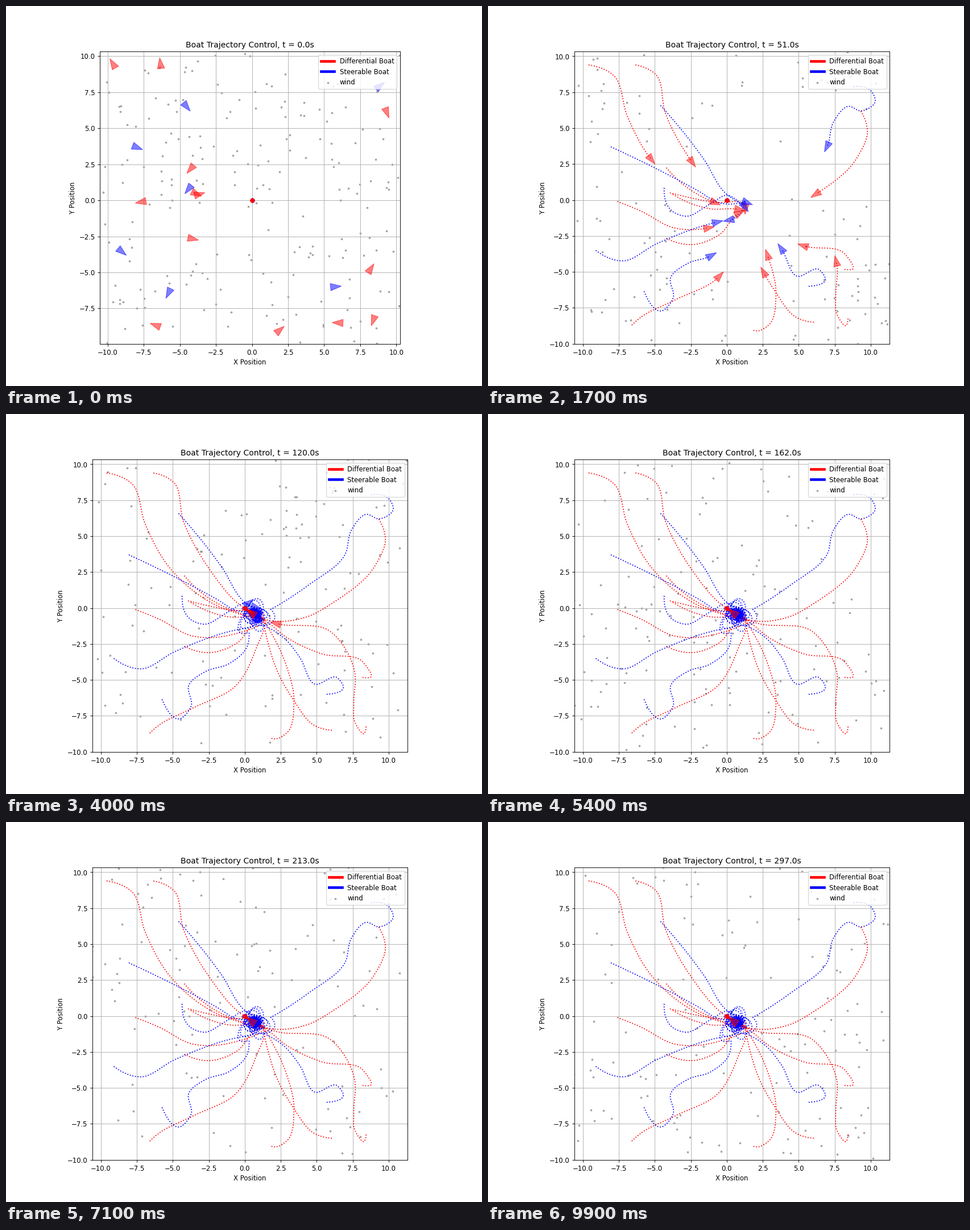
Animation, 837 px wide and 669 px high, one loop 10000 ms. Source, as a matplotlib script:

```python
import numpy as np
import matplotlib.pyplot as plt
from matplotlib.animation import FuncAnimation
from matplotlib.patches import Polygon

W, H, DPI = 837, 669, 83.7
FRAMES, SUB = 100, 8            # animation frames, trail samples per frame
CHECK = 17                      # time, in frames, at the end of a boat's first leg
HOME = np.array([0.52, -0.37])  # where the red boats hold against the wind
HUB = np.array([0.68, -0.45])   # what the blue boats circle around
REST_DIR = np.radians(144)
HULL = np.array([[0.5, 0], [-0.25, 0.25], [-0.25, -0.25]])

rng = np.random.default_rng(7)
clock = np.arange((FRAMES - 1) * SUB + 1) / SUB
boats = []


def smooth(points):
    """Cubic Hermite curve through points: knots, parameter, positions."""
    p = np.array(points, float)
    t = np.r_[0, np.cumsum(np.hypot(*np.diff(p, axis=0).T))]
    m = np.gradient(p, t, axis=0, edge_order=2)
    u = np.linspace(0, t[-1], 800)
    i = np.clip(np.searchsorted(t, u, side="right") - 1, 0, len(t) - 2)
    h = (t[i + 1] - t[i])[:, None]
    a = (u - t[i])[:, None] / h
    b = 1 - a
    q = (b * b * (1 + 2 * a) * p[i] + a * a * (1 + 2 * b) * p[i + 1]
         + a * b * h * (b * m[i] - a * m[i + 1]))
    return t, u, q


def unit(angle):
    return np.column_stack([np.cos(angle), np.sin(angle)])


def orbit(pos, late, arrive):
    """Shrinking, wobbling circles around HUB after arrival."""
    rel = pos[late][0] - HUB
    tau = clock[late] - arrive
    r0 = np.hypot(*rel)
    r = 0.06 + (r0 - 0.06) * np.exp(-tau / 14)
    r *= 1 + 0.35 * np.sin(rng.uniform(0.9, 1.7) * tau)
    step = pos[late][0] - pos[np.argmax(late) - 2]
    turn = 1 if rel[0] * step[1] - rel[1] * step[0] > 0 else -1
    spin = np.cumsum(0.45 / np.maximum(r, 0.3)) / SUB
    pos[late] = HUB + r[:, None] * unit(np.arctan2(rel[1], rel[0]) + turn * spin)


def add_boat(color, heading, *leg, then=()):
    """Steady speed along the bends of leg (done at CHECK), then on to the centre."""
    red = color == "red"
    finish = [(1.25, -0.75), tuple(HOME)] if red else []
    t, u, q = smooth([*leg, *then, *finish])
    s = np.r_[0, np.cumsum(np.hypot(*np.diff(q, axis=0).T))]
    speed = np.interp(t[len(leg) - 1], u, s) / CHECK
    arrive = s[-1] / speed
    pos = np.column_stack([np.interp(clock * speed, s, q[:, k]) for k in (0, 1)])
    late = clock >= arrive
    if not red and late.any():
        orbit(pos, late, arrive)

    v = np.gradient(pos, axis=0)
    v /= np.maximum(np.hypot(*v.T), 1e-9)[:, None]
    fade = (arrive - clock) / 3 if red else (arrive + 26 - clock) / 18
    w = np.clip(fade, 0, 1)[:, None]
    d = w * v + (1 - w) * unit([REST_DIR])
    w = np.clip(1 - clock / 2, 0, 1)[:, None]
    d = w * unit([np.radians(heading)]) + (1 - w) * d
    boats.append((color, pos, np.arctan2(d[:, 1], d[:, 0])))


# Start, a few bends and the place reached at CHECK.
add_boat("red", 121, (-9.6, 9.4), (-7.9, 8.7), (-6.9, 5.8), (-5.3, 2.9),
         then=[(-2, 0.2)])
add_boat("red", 97, (-6.34, 9.4), (-5, 8.8), (-4.25, 6), (-2.45, 2.7),
         then=[(-0.2, 0.1)])
add_boat("red", 230, (-4.2, 2.25), (-2.2, 0.5), (-0.9, -0.15))
add_boat("red", -25, (-3.95, 0.5), (-1, -0.15), (1.3, -0.5))
add_boat("red", 15, (-3.75, 0.4), (-1.2, -0.6), (0.8, -0.65))
add_boat("red", 191, (-7.6, -0.1), (-6, -0.75), (-3.6, -1.95), (-1.35, -1.95))
add_boat("red", -13, (-4.2, -2.65), (-2.5, -3.1), (-0.5, -2.4), (0.8, -0.95))
add_boat("red", 160, (-6.6, -8.7), (-6.1, -8.25), (-3.6, -6.95), (-0.57, -5.35),
         then=[(0.75, -2.9)])
add_boat("red", 40, (1.85, -9.06), (2.1, -9.1), (2.9, -8.7), (3.42, -6.6),
         (2.85, -3.9), then=[(1.65, -1.4)])
add_boat("red", 178, (6.05, -8.5), (5, -8.25), (3.3, -6.25), (2.6, -5.1),
         then=[(1.4, -1.5)])
add_boat("red", 251, (8.43, -8.24), (8.3, -8.72), (7.63, -7.9), (7.57, -6.8),
         (7.62, -4.35), then=[(5.9, -1.6), (2.1, -1.05)])
add_boat("red", 57, (8.18, -4.82), (8.75, -4.8), (8.2, -3.75), (5.4, -3.2),
         then=[(3, -2.1)])
add_boat("blue", -51, (-4.6, 6.58), (-1.6, 2.85), (0, 0.4), (1.2, -0.35))
add_boat("blue", -21, (-8.05, 3.7), (-2, 0.65), (-0.5, -0.2), (1.3, -0.1))
add_boat("blue", 232, (-4.35, 0.85), (-3.75, -0.8), (-2.9, -1.12), (-1.2, -0.3),
         (0.05, 0.33), (1.1, -0.6), (0.3, -1.4))
add_boat("blue", -39, (-9.1, -3.5), (-7.25, -4.23), (-4.9, -3.05), (-0.75, -1.55),
         then=[(1.2, -1.2)])
add_boat("blue", 244, (-5.75, -6.35), (-4.5, -7.7), (-3.72, -6.8), (-3.9, -5.4),
         (-2.7, -4.4), (-1.15, -3.9), then=[(0.15, -2.7), (0.3, -1.7)])
add_boat("blue", 5, (5.69, -6), (6.85, -5.5), (6.4, -4.83), (4.9, -5.3),
         (3.83, -3.45), then=[(2.9, -2.25), (1.3, -1.2)])
add_boat("blue", 38, (8.79, 7.88), (10.05, 7.55), (10.32, 6.9), (9.3, 6.2),
         (8.5, 6.52), (7.4, 5.4), (7, 3.8), then=[(4.5, 1.65), (1.8, -0.1)])
add_boat("red", -69, (9.31, 6.18), (9.77, 4.8), (9.05, 2.95), (6.25, 0.45),
         then=[(4.2, -0.65), (2, -0.9)])

# Wind specks: drifting random walk, wrapped inside a square.
gusts = rng.normal((0.9, -0.6), 0.5, (FRAMES, 200, 2))
gusts[0] = rng.uniform(-10.4, 10.4, (200, 2))
wind_pos = (np.cumsum(gusts, axis=0) + 13) % 26 - 13

fig, ax = plt.subplots(figsize=((W + 0.01) / DPI, (H + 0.01) / DPI), dpi=DPI)
ax.set_aspect("equal")
ax.grid(True)
ax.set_xlabel("X Position")
ax.set_ylabel("Y Position")

keys = [ax.plot([], [], color=c, lw=4, label=f"{kind} Boat")[0]
        for c, kind in (("red", "Differential"), ("blue", "Steerable"))]
wind = ax.scatter(*wind_pos[0].T, s=5, color="gray", alpha=0.6, label="wind")
hulls = [ax.add_patch(Polygon(HULL, color=c, alpha=0.5, zorder=2.5))
         for c, _, _ in boats]
trails = [ax.plot([], [], ":", color=c)[0] for c, _, _ in boats]
ax.plot(0, 0, "bo", zorder=3)
ax.plot(0, 0, "ro", zorder=3)
ax.legend(handles=[*keys, wind], loc="upper right")


def draw(frame):
    k = frame * SUB
    lo, hi = np.zeros(2), np.zeros(2)
    for (_, pos, angle), hull, trail in zip(boats, hulls, trails):
        c, s = np.cos(angle[k]), np.sin(angle[k])
        hull.set_xy(HULL @ np.array([[c, s], [-s, c]]) + pos[k])
        path = pos[:k + 1]
        trail.set_data(*path.T)
        lo = np.minimum(lo, path.min(axis=0))
        hi = np.maximum(hi, path.max(axis=0))
    pad = 0.05 * (hi - lo)
    ax.set_xlim(lo[0] - pad[0], hi[0] + pad[0])
    ax.set_ylim(lo[1] - pad[1], hi[1] + pad[1])
    wind.set_offsets(wind_pos[frame])
    ax.set_title(f"Boat Trajectory Control, t = {frame * 3:.1f}s")


anim = FuncAnimation(fig, draw, frames=FRAMES, interval=100, repeat=True,
                     repeat_delay=0)
plt.show()
```
